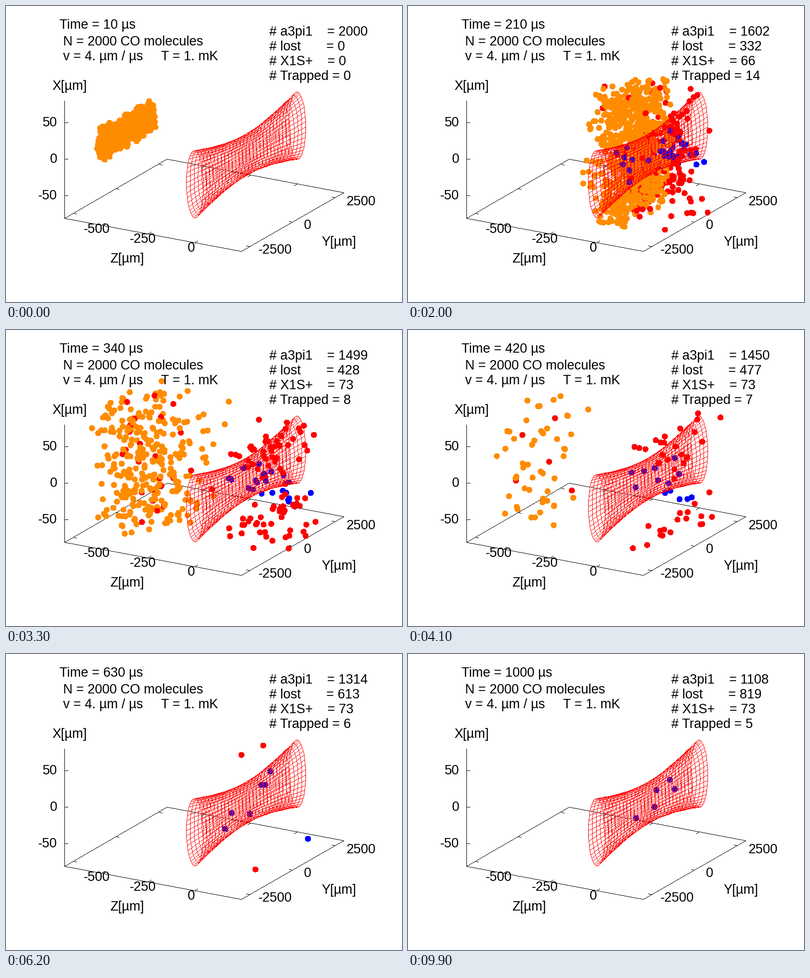
Animation, 800 px wide and 600 px high, one loop 10000 ms. Source, as a matplotlib script:

```python
import numpy as np
import matplotlib.pyplot as plt
from matplotlib.animation import FuncAnimation

W, H, DPI = 800, 600, 100
FRAMES, STEP = 100, 10
PX = 72 / DPI
ORANGE, RED, BLUE, BLACK = (1, 0.549, 0), (1, 0, 0), (0, 0, 1), (0, 0, 0)
Z_MIN, Z_MAX, X_LIM, Y_LIM = -700, 250, 80, 3000

plt.rcParams["font.family"] = "Liberation Sans"
fig = plt.figure(figsize=(W / DPI, H / DPI), dpi=DPI, facecolor="white")
ax = fig.add_axes([0, 0, 1, 1])
ax.axis("off")


def project(x, y, z):
    """Stage position of a point given in micrometres."""
    u = (z - Z_MIN) / (Z_MAX - Z_MIN)
    v = (y + Y_LIM) / (2 * Y_LIM)
    return np.stack([118 + 357 * u + 207 * v,
                     429.5 + 67.5 * u - 119 * v - 1.481 * (x + X_LIM)], -1)


def label(x, y, text, ha="left"):
    return ax.text(x, y, text, ha=ha, va="baseline", fontsize=26.67 * PX, zorder=1)


def draw_lines(lines, color, z):
    """Crisp one-pixel lines without antialiasing."""
    img = np.zeros((H, W, 4))
    for line in lines:
        pts = np.rint(line)
        for p, q in zip(pts[:-1], pts[1:]):
            n = int(np.abs(q - p).max()) + 1
            x, y = np.rint(np.linspace(p, q, n)).astype(int).T
            img[y, x] = (*color, 1)
    ax.imshow(img, extent=(-0.5, W - 0.5, H - 0.5, -0.5), aspect="auto",
              interpolation="nearest", zorder=z)


# Axes and ticks
axes = [[(118, 192), (118, 430), (475, 497), (682, 378), (325, 310), (118, 430)]]
for x in (-50, 0, 50):
    y = 310 - 1.481 * x
    axes.append([(118, y), (125, y)])
for z in (-500, -250, 0):
    for side in (-1, 1):
        p = project(-X_LIM, side * Y_LIM, z)
        axes.append([p, p - side * np.array([6, -3.5])])
for y in (-2500, 0, 2500):
    for z, d in ((Z_MIN, 1), (Z_MAX, -1)):
        p = project(-X_LIM, y, z)
        axes.append([p, p + d * np.array([7, 1.3])])
draw_lines(axes, BLACK, 2)

# Texts
for i, s in enumerate(("50", "0", "-50")):
    label(103, 244 + 74 * i, s, "right")
for x, y, s in ((182.5, 460, "-500"), (276, 480, "-250"), (373.5, 498, "0"),
                (543, 501, "-2500"), (609, 452, "0"), (717, 403, "2500"),
                (127.5, 170, "X[µm]"), (244, 520, "Z[µm]"), (671.5, 486, "Y[µm]")):
    label(x, y, s, "center")
label(108, 80, " N = 2000 CO molecules")
label(108, 110, " v = 4. µm / µs     T = 1. mK")
clock = label(108, 46, "")
COUNTERS = ("# a3pi1    = ", "# lost       = ", "# X1S+    = ", "# Trapped = ")
counters = [label(532, 59 + 30 * i, "") for i in range(4)]

# Laser beam: a hyperboloid along Y
RINGS, SPOKES, WAIST, MOUTH = 30, 40, 28, 46


def beam_radius(s):
    return np.sqrt(WAIST ** 2 + (MOUTH ** 2 - WAIST ** 2) * s ** 2)


s, phi = np.meshgrid(np.linspace(-1, 1, RINGS), np.linspace(0, 2 * np.pi, SPOKES + 1))
r = beam_radius(s)
mesh = project(r * np.cos(phi), Y_LIM * s, r * np.sin(phi))
draw_lines([*mesh, *mesh.transpose(1, 0, 2)], RED, 4)

# Molecules fly in, bounce off a field ramp near the beam and fly back
N, Z_RAMP, BRAKE = 2000, -40, 0.2
rng = np.random.default_rng(12)
x0 = rng.normal(3, 5.5, N)
y0 = rng.uniform(-1500, 1500, N)
z0 = rng.normal(-683, 8, N)
vx, vy = rng.normal(0, 0.54, (2, N))
vz = rng.normal(4, 0.56, N)
t_ramp = (Z_RAMP - z0) / vz
t_turn = vz / BRAKE


def in_field(t):
    """Z position and speed while the field acts."""
    u = np.clip(t - t_ramp, 0, 2 * t_turn)
    back = np.maximum(t - t_ramp - 2 * t_turn, 0)
    z = z0 + vz * np.minimum(t, t_ramp) + vz * u - BRAKE * u ** 2 / 2 - vz * back
    return z, vz - BRAKE * u


# Decay, or pumping inside the beam, frees a molecule from the field
t_free = 10 + rng.exponential(2150, N)
t_pump = t_ramp + t_turn
x_pump = np.abs(x0 + vx * t_pump)
pumped = np.flatnonzero((x_pump < 42) & (t_pump < t_free))[:205]
pumped = pumped[np.argsort(x_pump[pumped])]
ground = pumped[:66]
t_free[pumped] = t_pump[pumped]
z_free, v_free = in_field(t_free)
v_free[pumped] = rng.normal(1.3, 0.65, len(pumped))
v_free[ground] = rng.normal(1.9, 0.6, len(ground))
freed_color = np.tile(RED, (N, 1)).astype(float)
freed_color[ground] = BLUE


def cloud(t):
    x, y = x0 + vx * t, y0 + vy * t
    z = np.where(t < t_free, in_field(t)[0], z_free + v_free * (t - t_free))
    inside = (np.abs(x) < 84) & (z > Z_MIN) & (z < Z_MAX)
    return project(x, y, z), inside


# Only pumped molecules may linger near the beam
lingers = cloud(560)[1]
lingers[pumped] = False

# Trapped molecules swing across the beam and drift slowly along it
M = 20
y_trap = rng.uniform(-1800, 1900, M)
vy_trap = rng.normal(0, 0.4, M)
swing = rng.uniform(0.3, 0.9, (2, M)) * beam_radius(y_trap / Y_LIM)
omega = rng.uniform(0.011, 0.017, (2, M))
phase = rng.uniform(0, 2 * np.pi, (2, M))


def trapped_at(t, n):
    x, z = swing * np.sin(omega * t + phase)
    return project(x, y_trap + vy_trap * (t - 500), z)[:n]


# Counters between a few key times
KEYS = [10, 120, 165, 215, 280, 420, 630, 840, 1000]
LOST = [0, 106, 147, 352, 392, 477, 613, 739, 819]
TRAPPED = [0, 0, 0, 16, 8, 7, 6, 5, 5]


def counts(t):
    lost, trapped = (int(round(np.interp(t, KEYS, v))) for v in (LOST, TRAPPED))
    pumped_n = int(round(np.interp(t, [165, 215], [0, 73])))
    return N - lost - pumped_n, lost, pumped_n, trapped


dots = ax.scatter([], [], s=(11 * PX) ** 2, linewidths=0, antialiased=False, zorder=3)
ax.set_xlim(-0.5, W - 0.5)
ax.set_ylim(H - 0.5, -0.5)


def update(i):
    t = STEP * (i + 1)
    numbers = counts(t)
    pts, inside = cloud(t)
    show = inside & ~lingers
    cols = np.where((t < t_free)[:, None], ORANGE, freed_color)[show]
    bound = trapped_at(t, numbers[-1])
    dots.set_offsets(np.vstack([pts[show], bound]))
    dots.set_facecolors(np.vstack([cols, np.tile(BLUE, (len(bound), 1))]))
    clock.set_text(f"Time = {t} µs")
    for text, name, n in zip(counters, COUNTERS, numbers):
        text.set_text(f"{name}{n}")
    return [dots, clock, *counters]


anim = FuncAnimation(fig, update, frames=FRAMES, interval=100, repeat=True,
                     repeat_delay=0, blit=False)
plt.show()
```
